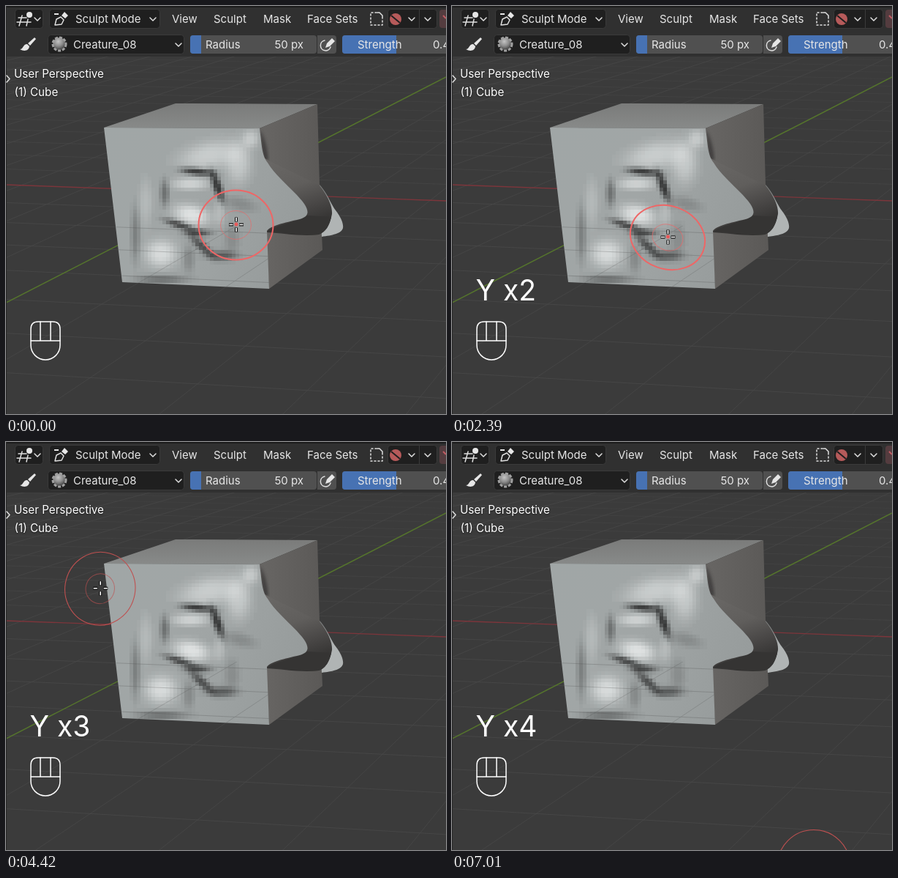
These frames come from a looping animation (602x557 px, 7340 ms). An HTML page:

```html
<!DOCTYPE html>
<html lang="en">
<head>
<meta charset="utf-8">
<title>Brush pie menu</title>
<style>
  html, body { margin: 0; width: 100%; height: 100%; overflow: hidden; background: #3b3b3b; }
  svg { display: block; width: 602px; height: 557px; font: 15px Inter, "Noto Sans", sans-serif; fill: #e6e6e6; }
  .line { fill: none; stroke: #e0e0e0; stroke-width: 1.5; stroke-linecap: round; stroke-linejoin: round; }
  .dark { fill: #1f1f1f; stroke: #3a3a3a; }
  .field { fill: #505050; }
  .blue { fill: #4772b3; }
  .note { fill: #fff; font-size: 15.2px; text-shadow: 0 1px 2px #0009; }
</style>
</head>
<body>
<svg viewBox="0 0 602 557" xmlns="http://www.w3.org/2000/svg">
  <defs>
    <radialGradient id="ball" cx=".42" cy=".3" r=".72">
      <stop offset="0" stop-color="#c4c4c4"/><stop offset=".5" stop-color="#8a8a8a"/><stop offset="1" stop-color="#2e2e2e"/>
    </radialGradient>
    <linearGradient id="front" x1="0" y1="0" x2="1" y2=".3">
      <stop offset="0" stop-color="#a0a6a6"/><stop offset=".5" stop-color="#a1a6a6"/><stop offset="1" stop-color="#979c9c"/>
    </linearGradient>
    <linearGradient id="top" x1="0" y1="0" x2="0" y2="1">
      <stop offset="0" stop-color="#7a7b7a"/><stop offset="1" stop-color="#888a89"/>
    </linearGradient>
    <linearGradient id="side" x1="0" y1="0" x2="1" y2="0">
      <stop offset="0" stop-color="#686664"/><stop offset="1" stop-color="#5b5957"/>
    </linearGradient>
    <linearGradient id="fold" x1="0" y1="0" x2=".3" y2="1">
      <stop offset="0" stop-color="#6a6866"/><stop offset=".45" stop-color="#605e5c"/>
      <stop offset=".75" stop-color="#484645"/><stop offset="1" stop-color="#333231"/>
    </linearGradient>
    <linearGradient id="tip" x1="0" y1="0" x2=".6" y2="1">
      <stop offset=".1" stop-color="#858888"/><stop offset=".6" stop-color="#b0b4b4"/>
    </linearGradient>
    <filter id="soft"><feGaussianBlur stdDeviation="2"/></filter>
    <clipPath id="face"><path d="M134 166L347 167C350 190 350 204 358 214C370 234 396 253 408 270C416 282 413 288 402 291C380 296 362 300 357 307L360 386L159 377Z"/></clipPath>
    <clipPath id="low"><path d="M148 280L357 305L360 386L159 377Z"/></clipPath>
    <g id="icon"><rect x="-30" y="-30" width="60" height="60" fill="#151515"/></g>
  </defs>

  <rect width="602" height="557" fill="#3b3b3b"/>
  <g id="grid" fill="none" stroke="#484848"></g>
  <path d="M0 244L602 266" stroke="#7d353b" stroke-width="1.3"/>
  <path d="M0 405L602 97" stroke="#55752c" stroke-width="1.5"/>

  <path d="M134 166L232 133L426 134L347 167Z" fill="url(#top)"/>
  <path d="M347 167L426 134L429 245L433 333L360 386L355 300Z" fill="url(#side)"/>
  <path d="M347 168Q357 185 359 210L352 212Z" fill="#3f3e3d" filter="url(#soft)"/>
  <path d="M429 244C440 256 444 270 451 279C458 288 462 297 461 303C459 311 446 313 432 315Z" fill="url(#tip)"/>
  <path d="M354 208C376 220 410 235 429 245C438 256 447 272 446 284C443 300 437 309 428 312C404 315 378 310 357 309Z" fill="url(#fold)"/>
  <path d="M357 309C366 299 396 296 412 286L445 288C442 301 437 308 428 312C404 314 380 307 357 309Z" fill="#353433"/>
  <g clip-path="url(#face)">
    <rect x="130" y="160" width="300" height="230" fill="url(#front)"/>
    <g id="relief" shape-rendering="crispEdges"></g>
  </g>
  <use href="#grid" clip-path="url(#low)" opacity=".3"/>

  <g id="header">
    <rect width="602" height="69" fill="#303030"/>
    <rect width="602" height="2" fill="#1c1c1c"/>
    <rect width="1" height="557" fill="#252525"/>
    <rect class="dark" x="12.5" y="4.5" width="38" height="26" rx="4"/>
    <path class="line" d="M17 16H28M15 22H34M22 13L18 27M30 18L28 27"/>
    <circle cx="32" cy="12" r="4"/>
    <rect class="dark" x="59.5" y="4.5" width="151" height="26" rx="4"/>
    <path class="line" d="M67 26L69 18L75 15L79 19L76 25Z"/>
    <path d="M76 13L80 8L85 13L81 17ZM66 10H72V12H66Z"/>
    <text x="95" y="23">Sculpt Mode</text>
    <text x="227" y="23">View</text>
    <text x="284" y="23">Sculpt</text>
    <text x="352" y="23">Mask</text>
    <text x="412" y="23">Face Sets</text>
    <path class="line" d="M507 9H499V26H515V18" stroke-dasharray="2 3"/>
    <path class="line" d="M508 9H511L515 13V17"/>
    <rect class="dark" x="522.5" y="4.5" width="67" height="26" rx="4"/>
    <path d="M565.5 5V30" stroke="#3a3a3a"/>
    <circle cx="533" cy="18" r="8" fill="#b65a5a"/>
    <path d="M527 13L539 23" stroke="#1f1f1f" stroke-width="2"/>
    <rect x="593" y="5" width="14" height="25" rx="4" fill="#543c3f"/>
    <path d="M598 13L602 17" stroke="#c05b62" stroke-width="2"/>

    <path d="M19 59C24 59 23 52 29 52L32 55C31 62 24 62 19 59ZM30 51L39 43L41 45L33 54Z"/>
    <rect class="dark" x="57.5" y="39.5" width="186" height="26" rx="4"/>
    <circle cx="73" cy="52" r="9" fill="url(#ball)" stroke="#a0a0a0" stroke-width="3" stroke-dasharray="4 2"/>
    <text x="92" y="57.5">Creature_08</text>
    <rect class="field" x="252" y="40" width="173" height="25" rx="4"/>
    <path class="blue" d="M267 40H256Q252 40 252 44V61Q252 65 256 65H267Z"/>
    <text x="273" y="57.5">Radius</text>
    <text x="407" y="57.5" text-anchor="end">50 px</text>
    <path class="field" d="M426 40H448Q452 40 452 44V61Q452 65 448 65H426Z"/>
    <path class="line" d="M436 47A7 7 0 1 0 444 56"/>
    <path d="M437 57L439 51L446 44L450 48L443 55Z"/>
    <rect class="field" x="460" y="40" width="150" height="25" rx="4"/>
    <path class="blue" d="M534 40H464Q460 40 460 44V61Q460 65 464 65H534Z"/>
    <text x="481" y="57.5">Strength</text>
    <text x="584" y="57.5">0.4</text>
  </g>
  <path class="line" d="M1 95L5 99.5L1 104"/>
  <text class="note" x="11" y="98">User Perspective</text>
  <text class="note" x="11.5" y="123">(1) Cube</text>

  <g id="pie">
    <text y="-211" text-anchor="middle" font-size="23.6" fill="#fff">Creature</text>
    <path id="disc" fill="#808080"/>
    <g id="items"></g>
  </g>
  <g id="ring" fill="none"><ellipse/><ellipse stroke-width="1" stroke-opacity=".65"/></g>
  <circle id="dot" r="2.5" fill="#e85a5a"/>
  <g id="cross">
    <path d="M-10 0H-4M4 0H10M0 -10V-4M0 4V10" stroke="#111" stroke-width="4"/>
    <path d="M-9.5 0H-4.5M4.5 0H9.5M0 -9.5V-4.5M0 4.5V9.5" stroke="#fff" stroke-width="1.6"/>
  </g>
  <path id="plus" d="M-8 0H8M0 -8V8" stroke="#fff" stroke-width="2"/>
  <path id="arrow" d="M0 0V16L3.700 12.600L6.600 19L9 18L6.200 11.700H11Z" fill="#fff" stroke="#111"/>

  <text id="keys" x="32.5" y="402" font-size="39" fill="#fff"></text>
  <g class="line" style="stroke:#fff">
    <path d="M34 441Q34 431 44 431H64Q74 431 74 441V463A20 20 0 0 1 34 463Z"/>
    <path d="M34 457H74M47 431V457M61 431V457"/>
  </g>
</svg>
<script>
const LOOP = 7340, RAD = Math.PI / 180;
const $ = id => document.getElementById(id);
const add = (parent, tag, attrs) => {
  const el = document.createElementNS('http://www.w3.org/2000/svg', tag);
  for (const k in attrs) el.setAttribute(k, attrs[k]);
  return parent.appendChild(el);
};
let seed = 8;
const rand = () => (seed = (seed * 16807) % 2147483647) / 2147483647;

// Floor grid in two-point perspective
function buildGrid() {
  const far = { x: 1150, y: -183 }, origin = { x: 293.5, y: 255 }, depth = origin.y - far.y;
  for (let k = -14; k <= 22; k++) {
    if (!k) continue;
    const x = origin.x + 100 * k, s = 800 / depth;
    add($('grid'), 'path', { d: `M${far.x} ${far.y}L${far.x + (x - far.x) * s} ${far.y + depth * s}`, opacity: .75 });
  }
  for (let k = -10; k <= 16; k++) {
    if (!k) continue;
    const s = 1 / (1 + .05 * k);
    const x = far.x + (origin.x - far.x) * s, y = far.y + depth * s;
    const slope = (y - far.y) / (x + 11700);
    add($('grid'), 'path', { d: `M0 ${y - x * slope}L602 ${y + (602 - x) * slope}`, opacity: k > 0 ? .7 - k * .025 : .85 });
  }
}

// Sculpted relief: soft bumps (x, y, rx, ry, angle, light) sampled in coarse cells
const bumps = [
  [278, 204, 40, 18, -12, 42], [318, 214, 17, 28, 0, 38], [335, 181, 11, 12, 0, 36],
  [261, 226, 22, 5, 6, -110], [289, 246, 6, 22, -20, -105], [252, 243, 24, 8, 0, 48],
  [254, 285, 24, 13, 12, 66], [217, 255, 6, 18, 0, -50], [238, 299, 22, 5, 18, -90],
  [262, 310, 18, 5, 0, -75], [268, 328, 20, 6, 42, -80], [295, 341, 20, 7, 0, -65],
  [292, 283, 8, 16, 0, 22], [212, 338, 21, 18, 0, 58], [212, 373, 34, 6, 0, -48],
  [177, 312, 6, 36, 0, -36], [191, 268, 9, 30, 0, 20], [250, 345, 8, 18, 0, -26],
  [320, 270, 22, 9, 15, -22], [309, 318, 10, 20, 0, -20]
];
function light(x, y) {
  return bumps.reduce((sum, [cx, cy, rx, ry, a, v]) => {
    const c = Math.cos(a * RAD), s = Math.sin(a * RAD), dx = x - cx, dy = y - cy;
    const u = (dx * c + dy * s) / rx, w = (dy * c - dx * s) / ry;
    return sum + v * Math.exp(-Math.pow(u * u + w * w, 1.3));
  }, 0);
}
function buildRelief() {
  const size = 5;
  for (let y = 168; y < 386; y += size) for (let x = 144; x < 366; x += size) {
    const v = light(x + size / 2, y + size / 2);
    if (Math.abs(v) < 2) continue;
    add($('relief'), 'rect', {
      x, y, width: size, height: size,
      fill: v > 0 ? '#e9ecec' : '#222', opacity: Math.min(.85, Math.abs(v) / (v > 0 ? 76 : 125))
    });
  }
}

function brush(x, y, kind) {
  const g = add($('items'), 'g', { transform: `translate(${x} ${y})` });
  add(g, 'use', { href: '#icon' });
  if (kind === 'spikes' || kind === 'bumps') {
    for (let i = 0; i < 13; i++) {
      const a = i * 360 / 13 + rand() * 14;
      add(g, 'path', {
        d: kind === 'spikes' ? 'M-4 -20L-2 -29L3 -27L5 -20Z' : 'M-7 -21Q0 -32 7 -21Z',
        fill: a > 100 && a < 220 ? '#777' : '#aaa', transform: `rotate(${a})`
      });
    }
  }
  add(g, 'circle', { r: kind === 'bumps' ? 25 : kind === 'spikes' ? 23 : 26, fill: 'url(#ball)' });
  if (kind === 'crack') {
    add(g, 'path', { d: 'M-10 18Q-2 17 1 11Q-1 4 5 0Q12 -5 21 -7', fill: 'none', stroke: '#333', 'stroke-width': 2 });
    add(g, 'path', { d: 'M-9 20Q0 19 3 12Q1 5 6 2Q13 -3 21 -5', fill: 'none', stroke: '#aaa', 'stroke-width': .8 });
  } else if (kind === 'spine') {
    for (let i = 0; i < 6; i++) {
      const w = 5 + 3 * Math.sin(i), top = i * 7 - 18;
      add(g, 'rect', { x: -w, y: top, width: 2 * w, height: 4, rx: 2, fill: '#ccc' });
      add(g, 'path', { d: `M${-w} ${top + 5}H${w}`, stroke: '#555', 'stroke-width': 1.5, 'stroke-dasharray': '4 2' });
    }
  } else {
    for (let i = 0; i < 16; i++) {
      const a = i * 2.4, d = 5.2 * Math.sqrt(i), px = d * Math.cos(a), py = d * Math.sin(a), r = 1.5 + rand() * 2;
      add(g, 'circle', { cx: px + 1, cy: py + 1, r, fill: '#444', opacity: .75 });
      add(g, 'circle', { cx: px - 1, cy: py - 1, r, fill: '#c4c4c4', opacity: .7 });
    }
  }
}
function buildPie() {
  const pts = Array.from({ length: 64 }, (_, i) => {
    const a = i * 360 / 64 * RAD;
    return `${142 * Math.cos(a)} ${142 * Math.sin(a)}`;
  });
  $('disc').setAttribute('d', `M${pts.join('L')}Z`);
  [-60, 0, 60].forEach(x => add($('items'), 'path', {
    d: `M${x} -191L${x + 20} -171L${x} -151L${x - 20} -171Z`, fill: x > 0 ? '#4772b3' : '#7b7b7b'
  }));
  brush(0, -100, 'bumps');
  brush(100, 0, 'spikes');
  brush(0, 100, 'spine');
  brush(-100, 0, 'crack');
}

// Brush cursor poses: x, y, rx, ry, angle. A plain circle is off the mesh.
const off = (x, y) => [x, y, 50, 50, 0];
const rest = [314.5, 299, 51, 47.5, 0], before = [295, 314, 51.5, 47, 0], lower = [295, 316, 52, 43, 20];
const cheek = [242, 321.5, 53, 34, 50], inner = [285, 300, 48, 44, 30];
const path = [
  [0, rest], [200, rest], [400, off(72, 255)], [560, [300, 285, 51, 47, 0]], [680, off(499, 270)], [840, rest],
  [2100, rest], [2170, before], [2389, before], [2390, lower], [2720, lower],
  [3450, [210, 270, 46, 50, 15]], [3700, off(145, 208)], [3870, off(120, 187)], [4100, off(98, 176)],
  [4210, off(89, 172)], [4280, off(92, 170)], [4560, [165, 230, 46, 50, 30]], [4840, cheek], [5040, cheek],
  [5440, inner], [5590, inner], [5950, [385, 245, 30, 50, 0]], [6130, [428.5, 221, 17, 50, 0]],
  [6270, off(460, 205)], [6670, off(460, 205)], [7010, off(495, 579.5)], [LOOP, off(495, 579.5)]
];
function poseAt(t) {
  const i = Math.max(1, path.findIndex(k => k[0] > t));
  const [t0, a] = path[i - 1], [t1, b] = path[i];
  const f = (t - t0) / (t1 - t0);
  return a.map((v, n) => v + (b[n] - v) * f);
}

const pies = [[200, 1640, 315, 299], [2720, 4210, 295, 317], [5040, 6270, 242, 322]];
const presses = [200, 1570, 2720, 5040];
const within = (t, a, b) => t >= a && t < b;
const show = (id, on) => $(id).setAttribute('display', on ? 'inline' : 'none');
const place = (id, x, y, extra = '') => $(id).setAttribute('transform', `translate(${x} ${y})${extra}`);

function draw(t) {
  const pie = pies.find(p => within(t, p[0], p[1]));
  show('pie', pie);
  if (pie) place('pie', pie[2], pie[3]);

  const count = presses.filter(p => t >= p).length;
  $('keys').textContent = count ? 'Y' + (count > 1 ? ' x' + count : '') : '';

  const [x, y, rx, ry, angle] = poseAt(t), onMesh = Math.abs(rx - ry) > 2.5;
  place('ring', x, y, ` rotate(${angle})`);
  [...$('ring').children].forEach((el, i) => {
    el.setAttribute('rx', rx * (i ? .41 : 1));
    el.setAttribute('ry', ry * (i ? .41 : 1));
    el.setAttribute('stroke', onMesh ? '#ee6666' : '#bf5050');
  });
  $('ring').firstElementChild.setAttribute('stroke-width', onMesh ? 2 : 1.1);

  const away = pie && Math.hypot(x - pie[2], y - pie[3]) > 12;
  const plus = !away && (within(t, 970, 1040) || within(t, 1170, 1240) || within(t, 5040, 5590));
  show('arrow', away);
  show('plus', plus);
  show('cross', !away && !plus);
  show('dot', onMesh && !plus);
  place('dot', x + .5, y - (away ? -2 : 1));
  place('plus', x + .5, y + .5);
  place('cross', x + .5, y - .5);
  const [ax, ay] = poseAt(Math.min(t + 85, LOOP - 1));
  place('arrow', ax, ay);
}

buildGrid();
buildRelief();
buildPie();
// Drop-down chevrons
[[43, 18], [201, 18], [555, 18], [577, 18], [236, 53]].forEach(([x, y]) =>
  add($('header'), 'path', { class: 'line', d: `M${x - 4} ${y - 2}L${x} ${y + 2}L${x + 4} ${y - 2}` }));

const start = performance.now();
function tick() {
  draw((performance.now() - start) % LOOP);
  requestAnimationFrame(tick);
}
tick();
</script>
</body>
</html>
```
